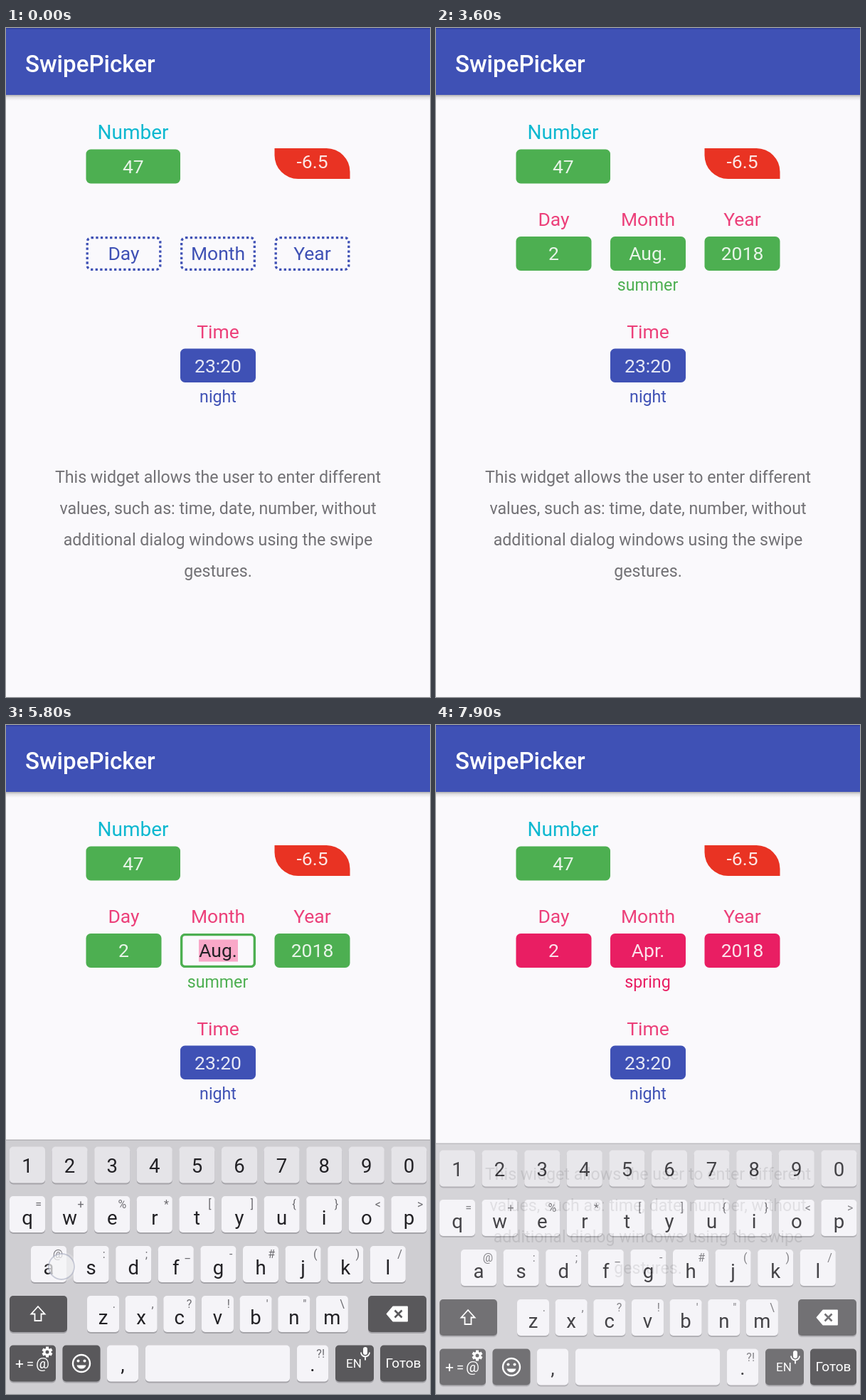
An HTML page for the animation above (8 s loop, 596x940 px).

```html
<!DOCTYPE html>
<html lang="en">
<head>
<meta charset="utf-8">
<title>SwipePicker</title>
<style>
  html, body { margin: 0; width: 100%; height: 100%; overflow: hidden; background: #faf9fc; }
  svg { display: block; width: 596px; height: 940px; font-family: Roboto, sans-serif; }
</style>
</head>
<body>
<svg id="stage" viewBox="0 0 596 940" xmlns="http://www.w3.org/2000/svg">
  <defs>
    <linearGradient id="shade" x1="0" y1="0" x2="0" y2="1">
      <stop offset="0" stop-color="#000" stop-opacity=".3"/>
      <stop offset=".4" stop-color="#000" stop-opacity=".1"/>
      <stop offset="1" stop-color="#000" stop-opacity="0"/>
    </linearGradient>
    <filter id="lift" x="-20%" y="-20%" width="140%" height="140%">
      <feDropShadow dx="0" dy="2" stdDeviation="3" flood-opacity=".28"/>
    </filter>
  </defs>
</svg>
<script>
const LOOP = 8000, STEP = 100;
const INDIGO = '#3f51b5', GREEN = '#4daf51', PINK = '#e91e63', HINT = '#ec407a';
const INK = '#222125', VALUE = 'rgba(255,255,255,.87)', PAPER = '#faf9fc';
const stage = document.getElementById('stage');

function add(parent, tag, attrs = {}, text) {
  const el = document.createElementNS('http://www.w3.org/2000/svg', tag);
  set(el, attrs);
  if (text !== undefined) el.textContent = text;
  parent.appendChild(el);
  return el;
}
function set(el, attrs) {
  for (const k in attrs) el.setAttribute(k, attrs[k]);
}
const rect = (p, x, y, width, height, rx, fill, more) =>
  add(p, 'rect', { x, y, width, height, rx, fill, ...more });
const label = (p, text, x, y, size, fill, more) =>
  add(p, 'text', { x, y, 'font-size': size, fill, 'text-anchor': 'middle', ...more }, text);
const group = p => add(p, 'g');
const show = (el, on) => { el.style.display = on ? '' : 'none'; };
const clamp = v => Math.max(0, Math.min(1, v));
const between = (t, a, b) => t >= a && t < b;

// Header
rect(stage, 0, 94, 596, 8, 0, 'url(#shade)');
rect(stage, 0, 0, 596, 94, 0, '#3f51b5');
rect(stage, 0, 0, 596, 1.5, 0, '#303f9f');
label(stage, 'SwipePicker', 27, 61.5, 33.1, '#fff', { 'text-anchor': 'start', 'font-weight': 500 });

// Fixed pickers
label(stage, 'Number', 178.5, 155.5, 28, '#0cb8d0');
rect(stage, 112.5, 170.5, 132.5, 48, 6.5, GREEN);
label(stage, '47', 178.8, 203.5, 26.5, VALUE);
add(stage, 'path', { d: 'M377.5 169H450.5A33 33 0 0 1 483.5 202V212H410.5A33 33 0 0 1 377.5 179Z', fill: '#e93323' });
label(stage, '-6.5', 430.5, 197, 26.5, VALUE);
label(stage, 'Time', 298, 435.5, 26.5, HINT);
rect(stage, 245, 450.5, 106, 47.5, 6.5, INDIGO);
label(stage, '23:20', 298, 483.5, 26.5, VALUE);
label(stage, 'night', 298, 526, 23.2, INDIGO);

[
  'This widget allows the user to enter different',
  'values, such as: time, date, number, without',
  'additional dialog windows using the swipe',
  'gestures.'
].forEach((line, i) => label(stage, line, 298, 639 + i * 43.9, 23.2, '#727175'));

// Date pickers
const fields = [['Day', '2', 112.5], ['Month', 'Aug.', 245], ['Year', '2018', 377.5]].map(([name, value, x]) => ({
  name,
  box: rect(stage, x, 293, 106, 48, 6.5, GREEN),
  dots: rect(stage, x + 1.7, 294.7, 102.6, 44.6, 5.5, 'none',
    { stroke: INDIGO, 'stroke-width': 3.3, 'stroke-dasharray': '3.3 3.3' }),
  value: label(stage, value, x + 53, 326, 26.5, VALUE),
  hint: label(stage, name, x + 53, 326, 26.5, INDIGO)
}));
const season = label(stage, 'summer', 297.5, 369, 23.2, GREEN);

// Editor
const editor = group(stage);
rect(editor, 246.7, 294.7, 102.6, 44.6, 5, PAPER, { stroke: GREEN, 'stroke-width': 3.3 });
const selection = rect(editor, 271, 301.5, 55, 31, 0, '#f9a8c8');
const entry = label(editor, 'Aug.', 298, 326, 26.5, INK);
const caret = rect(editor, 313, 301.5, 3.2, 31, 0, HINT);

// Keyboard
const board = group(stage);
rect(board, 0, 583, 596, 357, 0, '#cfced2');
rect(board, 0, 582.5, 596, 1.3, 0, '#adacb0');
const keys = {};
function key(id, x, y, w, fill) {
  rect(board, x, y + 2, w, 51, 5, '#a5a4a9');
  keys[id] = { face: rect(board, x, y, w, 51, 5, fill), fill };
}
function keyRow(chars, hints, x, y, w, pitch, fill, base, size = 27.5) {
  [...chars].forEach((c, i) => {
    const left = x + i * pitch;
    key(c, left, y, w, fill);
    keys[c].glyph = label(board, c, left + w / 2, y + base, size, INK);
    if (hints[i]) label(board, hints[i], left + w - 5, y + 17, 16, '#6d6c71', { 'text-anchor': 'end' });
  });
}
const LIGHT = '#f5f4f8', DARK = '#59585b';
keyRow('1234567890', '', 5, 592.5, 50, 59.6, '#e5e4e8', 36);
keyRow('qwertyuiop', '=+%*[]{}<>', 5, 662, 50, 59.6, LIGHT, 40);
keyRow('asdfghjkl', "@:;_-#()/", 35, 732, 50, 59.6, LIGHT, 40);
keyRow('zxcvbnm', '.,?!\'"\\', 114, 802, 45, 53.65, LIGHT, 40);
key('shift', 5, 802, 81, DARK);
key('back', 509, 802, 82, DARK);
key('sym', 5, 871.5, 65, DARK);
key('smile', 79.5, 871.5, 53, DARK);
keyRow(',', '', 142, 871.5, 44, 0, LIGHT, 36);
key('space', 196, 871.5, 203, LIGHT);
keyRow('.', ['?!'], 409, 871.5, 44, 0, LIGHT, 36);
key('lang', 463, 871.5, 54, DARK);
key('done', 526, 871.5, 65, DARK);

const icon = (d, more) => add(board, 'path', { d, fill: 'none', stroke: '#fff', 'stroke-width': 1.8, ...more });
icon('M45 817L54.5 827.5H49.5V837H40.5V827.5H35.5Z');
icon('M544 817.5H564V837.5H544L535.5 827.5Z', { fill: '#fff', 'stroke-linejoin': 'round' });
icon('M546.5 822.5L556.5 832.5M556.5 822.5L546.5 832.5', { stroke: DARK, 'stroke-width': 2.6 });
label(board, '+', 19, 904, 21, '#fff');
label(board, '=', 34, 904, 19, '#fff');
label(board, '@', 51.5, 904, 21, '#fff');
icon('M58 873.5V888.5M51.5 877.2L64.5 884.8M51.5 884.8L64.5 877.2', { 'stroke-width': 4 });
add(board, 'circle', { cx: 58, cy: 881, r: 4, fill: DARK, stroke: '#fff', 'stroke-width': 3 });
add(board, 'circle', { cx: 106, cy: 897, r: 12, fill: 'none', stroke: '#fff', 'stroke-width': 2.4 });
[101.5, 110.5].forEach(cx => add(board, 'circle', { cx, cy: 893.5, r: 2, fill: '#fff' }));
icon('M99.5 899.5H112.5A6.7 6.7 0 0 1 99.5 899.5Z', { fill: '#fff', stroke: 'none' });
label(board, 'EN', 489, 903, 17, '#fff');
rect(board, 502, 874, 6, 11, 3, '#fff');
icon('M499 881.5A6 6 0 0 0 511 881.5M505 888V892.5');
label(board, 'Готов', 558.5, 903, 19, '#fff');

// Key preview
const popup = group(stage);
rect(popup, 0, 0, 82, 130, 4, LIGHT, { filter: 'url(#lift)' });
const popupChar = label(popup, 'p', 41, 91, 52, INK, { 'font-weight': 700 });

// Touch marker
const finger = group(stage);
add(finger, 'circle', { r: 21.5, fill: '#fff', 'fill-opacity': .18 });
add(finger, 'circle', { r: 18, fill: '#f4f4f6', 'fill-opacity': .66, stroke: '#9a9fb8', 'stroke-opacity': .5, 'stroke-width': 1.8 });

const touches = [
  { from: 200, to: 2000, x: 316, y: 313, dragAt: 900, dragFor: 400, dy: -58 },
  { from: 4100, to: 4600, x: 316, y: 313 },
  { from: 5700, to: 6100, x: 78, y: 761 },
  { from: 6600, to: 7000, x: 550, y: 687 },
  { from: 7200, to: 7600, x: 558, y: 892 }
];
const presses = [
  { char: 'a', from: 5900, to: 6200, x: 19, y: 570 },
  { char: 'p', from: 6700, to: 7000, x: 514.5, y: 500 }
];
const FILLED = 900, EDIT = 4600, TYPE_A = 6000, TYPE_P = 6800, DONE = 7700;
const BOARD_IN = 4900, BOARD_OUT = 7900;

function drawFields(t) {
  const filled = t >= FILLED, color = t >= DONE ? PINK : GREEN;
  const k = clamp((t - FILLED + 100) / 400), rise = 1 - (1 - k) ** 3;
  for (const f of fields) {
    show(f.dots, !filled);
    show(f.box, filled);
    show(f.value, filled);
    set(f.box, { fill: color });
    set(f.hint, { y: 326 - 48 * rise, fill: filled ? HINT : INDIGO });
    if (f.name === 'Month') f.value.textContent = t >= DONE ? 'Apr.' : 'Aug.';
  }
  show(season, filled);
  season.textContent = t >= DONE ? 'spring' : 'summer';
  set(season, { fill: color });
}

function drawEditor(t) {
  const typed = t >= TYPE_A, last = t >= TYPE_P ? TYPE_P : TYPE_A;
  show(editor, between(t, EDIT, DONE));
  show(selection, !typed);
  entry.textContent = !typed ? 'Aug.' : t >= TYPE_P ? 'ap' : 'a';
  show(caret, typed && (t - last) % 1000 < 500);
  if (between(t, TYPE_A, DONE)) set(caret, { x: 298.5 + entry.getComputedTextLength() / 2 });
}

function drawBoard(t) {
  const opening = clamp((5200 - t) / 300), closing = t >= BOARD_OUT;
  show(board, t >= BOARD_IN);
  set(board, {
    transform: `translate(0 ${closing ? 5 : 24 * opening ** 2})`,
    opacity: closing ? .84 : 1 - .25 * opening
  });
  const press = presses.find(p => between(t, p.from, p.to));
  show(popup, !!press);
  for (const { char } of presses) {
    const down = press && press.char === char;
    set(keys[char].face, { fill: down ? '#dad9dd' : LIGHT });
    set(keys[char].glyph, { 'fill-opacity': down ? .7 : 1 });
  }
  if (press) {
    set(popup, { transform: `translate(${press.x} ${press.y})` });
    popupChar.textContent = press.char;
  }
  set(keys.done.face, { fill: t >= 7400 ? '#424144' : DARK });
}

function drawFinger(t) {
  const touch = touches.find(p => between(t, p.from, p.to));
  show(finger, !!touch);
  if (!touch) return;
  const drag = touch.dy ? touch.dy * clamp((t - touch.dragAt) / touch.dragFor) : 0;
  const fade = Math.min(clamp((t - touch.from + 100) / 200), clamp((touch.to - t) / 200));
  set(finger, { transform: `translate(${touch.x} ${touch.y + drag})`, opacity: fade });
}

function draw(t) {
  drawFields(t);
  drawEditor(t);
  drawBoard(t);
  drawFinger(t);
}

const start = performance.now();
function tick() {
  const t = (performance.now() - start) % LOOP;
  draw(Math.floor(t / STEP) * STEP);
  requestAnimationFrame(tick);
}
tick();
</script>
</body>
</html>
```
